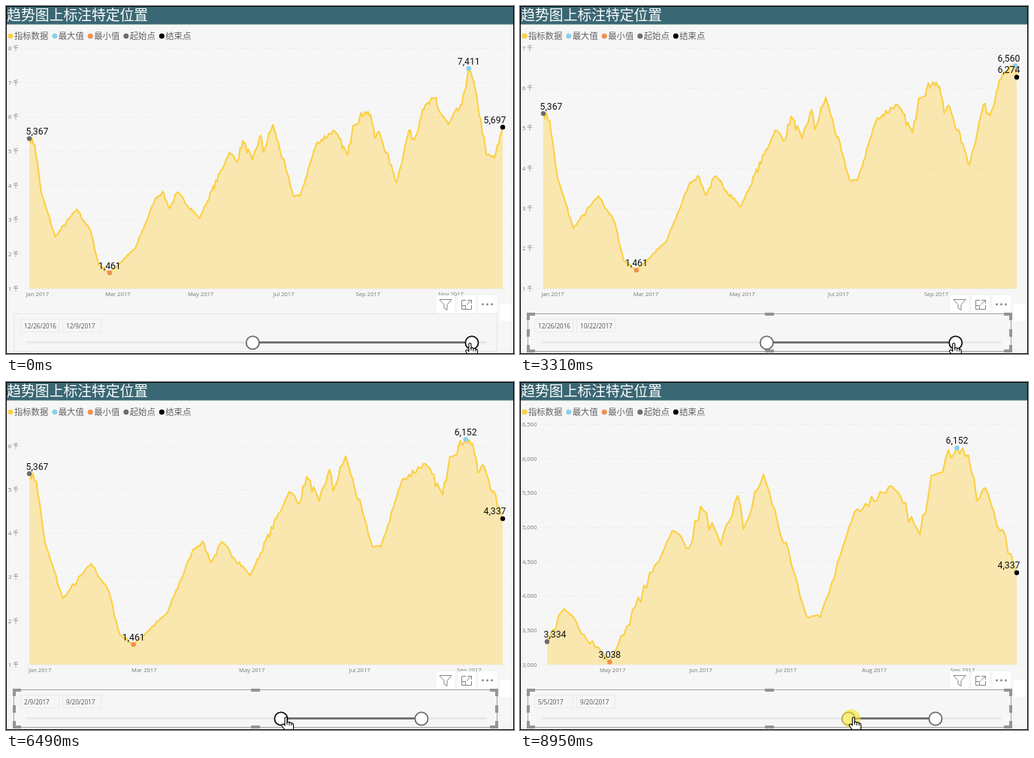
Write an HTML page that moves like this. It is 676x463 px and loops after 9080 ms.

```html
<!DOCTYPE html>
<html lang="zh-CN">
<head>
<meta charset="utf-8">
<title>趋势图上标注特定位置</title>
<style>
html, body { margin: 0; width: 100%; height: 100%; overflow: hidden; background: #f6f6f6; }
svg { display: block; width: 676px; height: 463px; }
text { font-family: "Open Sans", "Noto Sans CJK SC", "Noto Sans CJK", sans-serif; }
.title { font-size: 18.8px; fill: #fff; }
.legend { font-size: 11.3px; fill: #606060; }
.axis { font-size: 7.6px; fill: #777; }
.date { font-size: 8.1px; fill: #505050; }
.value { font: 12.2px Roboto, sans-serif; fill: #111; text-anchor: middle; }
.mid { text-anchor: middle; }
</style>
</head>
<body>
<svg id="stage" viewBox="0 0 676 463" xmlns="http://www.w3.org/2000/svg"></svg>
<script>
const LOOP = 9080, STEP = 70;
const TOP = 56, BASE = 376, RIGHT = 661;
const GOLD = '#fcd045', BLUE = '#8ad0ee', ORANGE = '#f28e50', GRAY = '#6b6b70', BLACK = '#000';
const MONTHS = 'Jan Feb Mar Apr May Jun Jul Aug Sep Oct Nov Dec'.split(' ');

// Main turns of the trend: day and value. A seeded wobble fills the days between.
const turns = [
  [0, 5367], [4, 5190], [9, 3760], [19, 2510], [35, 3310], [45, 2683], [51, 1700],
  [59, 1461], [78, 2180], [93, 3650], [98, 3820], [103, 3334], [109, 3810], [125, 3038],
  [147, 4950], [153, 4700], [157, 5300], [164, 4740], [170, 5460], [172, 4970], [179, 5770],
  [194, 3720], [199, 3690], [211, 5220], [224, 5600], [234, 4890], [238, 5750], [247, 6152],
  [251, 6050], [254, 5380], [257, 5570], [268, 4337], [270, 4090], [279, 5600], [283, 5320],
  [289, 6200], [299, 6560], [300, 6274], [308, 5780], [318, 6360], [323, 7411], [328, 6771],
  [336, 4900], [342, 4810], [348, 5697]
];

let seed = 7;
const random = () => (seed = seed * 16807 % 2147483647) / 2147483647;

function makeTrend() {
  const days = [turns[0][1]];
  for (let i = 1; i < turns.length; i++) {
    const [d0, v0] = turns[i - 1], [d1, v1] = turns[i];
    for (let d = d0 + 1; d <= d1; d++) {
      const p = (d - d0) / (d1 - d0), v = v0 + (v1 - v0) * p;
      const wobble = d < d1 ? (random() * 2 - 1) * Math.sin(Math.PI * p) : 0;
      days.push(v * (1 + 0.022 * wobble));
    }
  }
  return days;
}
const trend = makeTrend();

// Each drag moves one knob (0 start, 1 end) to a day; the chart follows at redraw.
const drags = [
  { press: 260, from: 600, until: 1080, release: 1410, redraw: 1670, knob: 1, day: 328 },
  { press: 2350, from: 2490, until: 2770, release: 2970, redraw: 3110, knob: 1, day: 300 },
  { press: 3900, from: 3970, until: 4310, release: 4310, redraw: 4520, knob: 1, day: 268 },
  { press: 5600, from: 5700, until: 6020, release: 6090, redraw: 6560, knob: 0, day: 45 },
  { press: 6960, from: 7030, until: 7860, release: 7930, redraw: 8140, knob: 0, day: 103 },
  { press: 8600, from: 8670, until: 8950, release: LOOP, redraw: LOOP, knob: 0, day: 130 }
];
const FULL = [0, 348];
const TRAVEL = [5130, 5550];

const stage = document.getElementById('stage');
function add(parent, tag, attrs, text) {
  const el = document.createElementNS('http://www.w3.org/2000/svg', tag);
  set(el, attrs);
  if (text !== undefined) el.textContent = text;
  return parent.appendChild(el);
}
function set(el, attrs) {
  for (const k in attrs) el.setAttribute(k, attrs[k]);
}
const show = (el, on) => set(el, { visibility: on ? 'visible' : 'hidden' });
const group = () => add(stage, 'g', {});
const box = (p, x, y, width, height, fill, more) => add(p, 'rect', { x, y, width, height, fill, ...more });
const dot = (p, cx, cy, r, fill) => add(p, 'circle', { cx, cy, r, fill });
const label = (p, x, y, cls, text) => add(p, 'text', { x, y, class: cls }, text);
const path = (p, d, stroke, more) => add(p, 'path', { d, stroke, fill: 'none', ...more });
const clamp = (v, lo, hi) => Math.max(lo, Math.min(hi, v));
const commas = v => Math.round(v).toLocaleString('en-US');

const dayOf = month => (Date.UTC(2017, month, 1) - Date.UTC(2016, 11, 26)) / 864e5;
function dateText(day) {
  const d = new Date(Date.UTC(2016, 11, 26 + day));
  return `${d.getUTCMonth() + 1}/${d.getUTCDate()}/${d.getUTCFullYear()}`;
}

function drawChart([a, b]) {
  const g = group();
  const seen = trend.slice(a, b + 1).map((v, i) => [a + i, v]);
  const best = sign => seen.reduce((p, q) => (q[1] - p[1]) * sign > 0 ? q : p);
  const max = best(1), min = best(-1);
  const lo = Math.floor(min[1] / 1000) * 1000, hi = Math.ceil(max[1] * 1.05 / 500) * 500;
  const fine = hi - lo < 4000, tick = fine ? 500 : 1000, left = fine ? 36 : 31;
  const px = d => left + (d - a) / (b - a) * (RIGHT - left);
  const py = v => BASE - (v - lo) / (hi - lo) * (BASE - TOP);

  for (let v = lo; v <= hi; v += tick) {
    const y = py(v);
    path(g, `M${left - 7} ${Math.floor(y) + 0.5}H668`, '#dedede', { 'stroke-dasharray': '1 3' });
    label(g, 3, y + 2.8, 'axis', fine ? commas(v) : v / 1000 + ' 千');
  }
  const line = 'M' + seen.map(([d, v]) => px(d).toFixed(1) + ' ' + py(v).toFixed(1)).join('L');
  path(g, `${line}V${BASE}H${left}Z`, 'none', { fill: GOLD, 'fill-opacity': 0.4 });
  path(g, line, GOLD, { 'stroke-width': 2.1, 'stroke-linejoin': 'round' });
  for (let m = 0; m < 12; m += b - a > 240 ? 2 : 1) {
    const d = dayOf(m);
    if (d >= a && d <= b) label(g, px(d), 386, 'axis mid', MONTHS[m] + ' 2017');
  }
  const marks = [[max, BLUE], [min, ORANGE], [seen[0], GRAY], [seen[seen.length - 1], BLACK]];
  for (const [[d, v], color] of marks) {
    dot(g, px(d), py(v), 3.2, color);
    label(g, clamp(px(d), left + 10.5, 650.5), py(v) - 5.4, 'value', commas(v));
  }
  return g;
}

function drawCharts() {
  const span = [...FULL];
  return [drawChart(span), ...drags.filter(d => d.redraw < LOOP).map(({ knob, day }) => {
    span[knob] = day;
    return drawChart(span);
  })];
}

function drawHeader() {
  box(stage, 0, 0, 676, 463, '#f6f6f6');
  box(stage, 0, 0, 676, 24.5, '#3a6774');
  label(stage, 1.3, 18.8, 'title', '趋势图上标注特定位置');
  let x = 6;
  [['指标数据', GOLD], ['最大值', BLUE], ['最小值', ORANGE],
    ['起始点', GRAY], ['结束点', BLACK]].forEach(([name, color]) => {
    dot(stage, x, 40, 3.5, color);
    label(stage, x + 5, 44.2, 'legend', name);
    x += name.length * 11.3 + 13.6;
  });
}

function drawTools() {
  const ink = '#83838d';
  for (const x of [573, 601, 629]) box(stage, x, 385, 24, 24, '#fff');
  box(stage, 657, 397, 18, 22, '#fff');
  path(stage, 'M577 390.5H593L587 397.5V404.5L583 402V397.5Z', ink);
  path(stage, 'M612 391.5H606.5V403.5H619.5V398M614 391.5H619.5V396M619.5 391.5L613 397.5M606.5 398.5H611.5V403.5', ink);
  for (const x of [634.5, 640.5, 646.5]) dot(stage, x, 397, 1.4, ink);
}

function drawSelection() {
  const g = group();
  box(g, 10.5, 409.5, 643, 50, 'none', { stroke: '#a2a2a2' });
  path(g, 'M11 418V410H20M644 410H653V418M653 451V459H644M20 459H11V451M326 410H338M326 459H338M11 430V440M653 430V440',
    '#959595', { 'stroke-width': 4 });
  return g;
}

function drawHand() {
  const g = group();
  path(g, 'M-2 1.5Q-2 0-.5 0T1 1.5V7Q1 6 2.5 6T4 7.5Q4 6.8 5.5 6.8T7 8.5Q7 7.8 8.2 8T9.5 10V14Q9.5 17 8 19V21H0V19Q-3 16-5.5 12Q-7 10-5.5 9.2T-2 11Z',
    '#000', { fill: '#fff', 'stroke-width': 1.1, 'stroke-linejoin': 'round' });
  path(g, 'M1 6V10M4 7V11M7 8V11', '#000');
  return g;
}

drawHeader();
const charts = drawCharts();
drawTools();
box(stage, 10.5, 409.5, 643, 50, 'none', { stroke: '#e6e6e6' });
const selection = drawSelection();
const dates = [19.5, 75.5].map(x => {
  box(stage, x, 416.5, 51, 17, 'none', { stroke: '#eaeaea' });
  return label(stage, x + 4.5, 429, 'date', '');
});
box(stage, 28, 446, 612, 3, '#e8e8e8');
const range = box(stage, 328, 446.3, 0, 2.6, '#666');
const knobs = FULL.map(() => add(stage, 'circle', { cy: 448, r: 8.6, fill: '#fff', 'stroke-width': 1.8 }));
const glow = dot(stage, 0, 448, 12.5, '#f7e52f');
const hand = drawHand();
box(stage, 0.5, 0.5, 675, 462, 'none', { stroke: '#000' });

// Share of a move done, in even steps that include both ends.
function progress(t, from, until) {
  if (t < from) return 0;
  const count = Math.round((until - from) / STEP) + 1;
  return Math.min(1, (Math.floor((t - from) / STEP) + 1) / count);
}

function render(t) {
  charts.forEach((g, i) => {
    show(g, (i === 0 || t >= drags[i - 1].redraw) && t < drags[i].redraw);
  });
  show(selection, t >= drags[0].release);

  const days = [...FULL];
  for (const { from, until, knob, day } of drags) {
    days[knob] += (day - days[knob]) * progress(t, from, until);
  }
  const xs = days.map(d => 328.3 + d * 0.838);
  const reach = progress(t, ...TRAVEL);
  const x = (xs[1] - 2) * (1 - reach) + (xs[0] + 7) * reach;
  const pressed = drags.some(d => t >= d.press && t < d.release);
  const light = Math.max(...drags.map(d =>
    progress(t, d.press, d.press + 2 * STEP) - progress(t, d.release, d.release + STEP)));

  days.forEach((d, i) => {
    dates[i].textContent = dateText(Math.round(d));
    const hover = Math.abs(x - xs[i]) < 11 && !pressed;
    set(knobs[i], { cx: xs[i], stroke: hover ? '#111' : '#6c6c6c' });
  });
  set(range, { x: xs[0], width: xs[1] - xs[0] });
  set(glow, { cx: (x + xs[reach < 0.5 ? 1 : 0]) / 2, opacity: 0.62 * light });
  set(hand, { transform: `translate(${x} ${448.5 - 2.5 * reach})` });
}

const began = performance.now();
function tick() {
  render((performance.now() - began) % LOOP);
  requestAnimationFrame(tick);
}
render(0);
requestAnimationFrame(tick);
</script>
</body>
</html>
```
